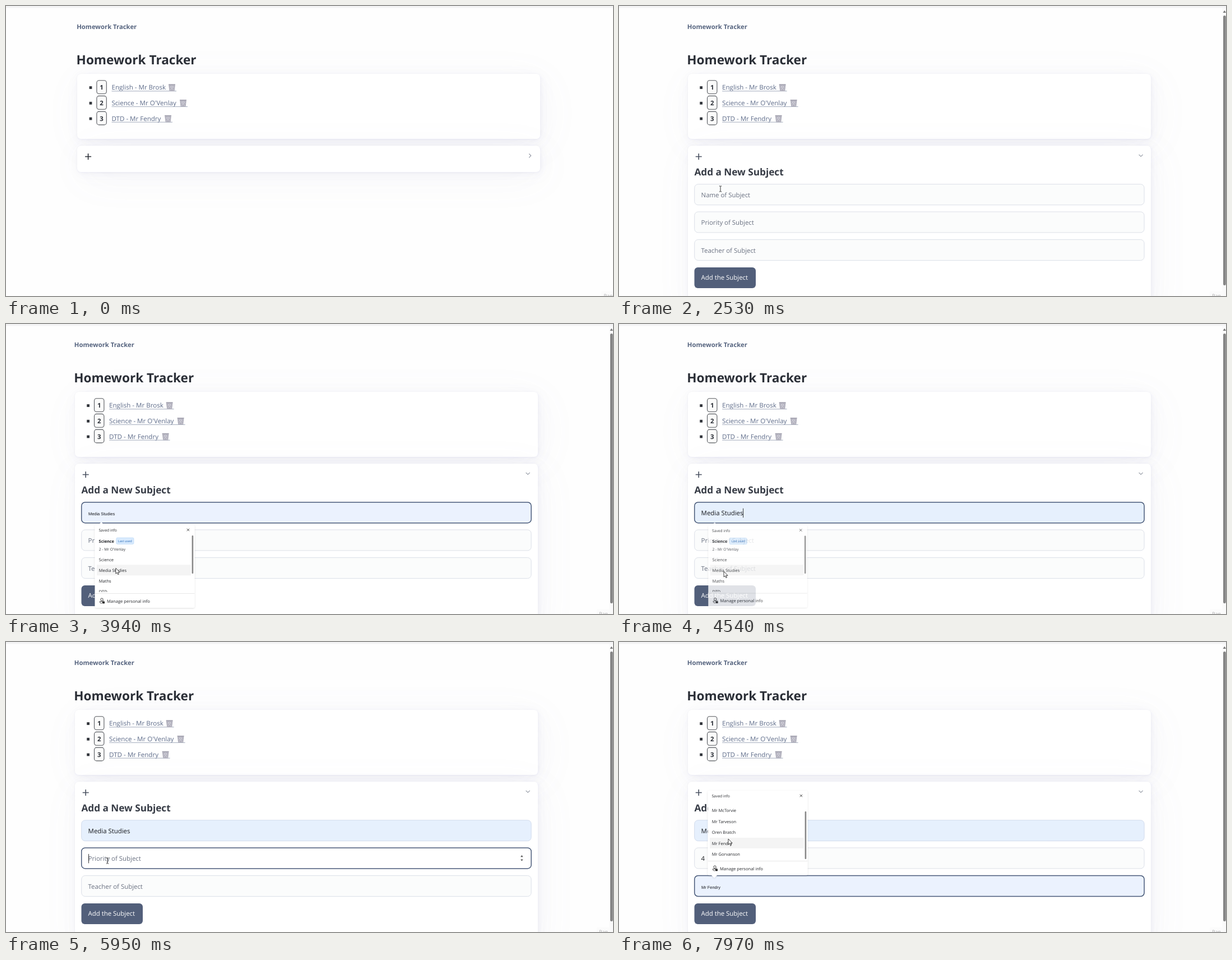
An HTML page for the animation above (8 s loop, 1083 by 517 pixels).

```html
<!DOCTYPE html>
<html lang="en">
<head>
<meta charset="utf-8">
<title>Homework Tracker</title>
<style>
html, body { margin: 0; width: 100%; height: 100%; overflow: hidden; background: #fefefe; }
#stage { position: relative; width: 1083px; height: 517px; overflow: hidden; }
.card {
  position: absolute; left: 127px; width: 826px; border-radius: 7px; background: #fff;
  box-shadow: 0 1px 2px rgba(129,135,185,.03), 1px 1px 5px rgba(129,135,185,.03),
    1px 2px 9px rgba(129,135,185,.035), 1px 3px 17px rgba(129,135,185,.04),
    3px 5px 31px rgba(129,135,185,.045), 6px 12px 74px rgba(129,135,185,.05),
    0 0 0 1px rgba(129,135,185,.015);
}
#list { top: 120.5px; height: 116px; }
#adder { top: 248.5px; }
svg { position: absolute; left: 0; top: 0; }
text { font-family: "Open Sans", "Noto Sans", sans-serif; text-rendering: geometricPrecision; white-space: pre; }
.preview { font-family: "Liberation Sans", Arial, sans-serif; }
</style>
</head>
<body>
<div id="stage">
  <div class="card" id="list"></div>
  <div class="card" id="adder"></div>
  <svg width="1083" height="517" viewBox="0 0 1083 517">
    <defs>
      <clipPath id="clipDown"><rect x="158" y="376" width="180" height="102"/></clipPath>
      <clipPath id="clipUp"><rect x="158" y="288" width="180" height="102"/></clipPath>
      <filter id="soft" x="-10%" y="-10%" width="120%" height="120%">
        <feDropShadow dx="0" dy="1" stdDeviation="1.5" flood-color="#000" flood-opacity=".13"/>
      </filter>
    </defs>
    <rect width="1083" height="3.6" fill="#f4f4f5"/>
    <g id="page"></g>
    <g id="live"></g>
  </svg>
</div>
<script>
const LOOP = 8000;
const OPEN = 2060, FOCUS1 = 2660, FILL = 2950, UNFILL = 3270, SWAP = 3900, PICK = 4500;
const FOCUS2 = 4920, TYPED = 6130, FOCUS3 = 6850, SCROLL = 7480;
const SHIFT = -4.4;
const INK = '#2b2f37', SLATE = '#56647f';
const $ = id => document.getElementById(id);
const clamp = v => Math.max(0, Math.min(1, v));
const between = (t, a, b) => t >= a && t < b;

const text = (x, y, size, fill, str, extra = '') =>
  `<text x="${x}" y="${y}" font-size="${size}" fill="${fill}" ${extra}>${str}</text>`;
const rect = (x, y, w, h, fill, extra = '') =>
  `<rect x="${x}" y="${y}" width="${w}" height="${h}" fill="${fill}" ${extra}/>`;
const line = (d, color, width, extra = '') =>
  `<path d="${d}" fill="none" stroke="${color}" stroke-width="${width}" ${extra}/>`;
const BOLD = 'font-weight="700"';

// Page header and subject list
const subjects = [["English - Mr Brosk", 304], ["Science - Mr O'Venlay", 324], ["DTD - Mr Fendry", 297]];

function bin(x, y) {
  return `<g transform="translate(${x} ${y})"><path d="M0 0H12L10.6 12.5H1.6Z" fill="#b3b2be"/>` +
    line('M3 3L9 11M6 2.6L9.6 7M9 3L3 11M6 2.6L2.6 7', '#dddce4', .7) +
    line('M.2 .6H11.8', '#9d9ca9', 1) + '</g>';
}

function subject([name, end], i) {
  const y = 145 + i * 27.7;
  return rect(148.6, y - 1.9, 4.8, 4.8, '#33363c') +
    rect(161.9, y - 12.3, 17.4, 23.8, '#fbfbfa', 'rx="4" stroke="#55585e" stroke-width="1.1"') +
    text(170.6, y + 4.3, 11.4, INK, i + 1, BOLD + ' text-anchor="middle"') +
    text(188.5, y + 4.4, 11.55, '#5d6b89', name) +
    line(`M188.5 ${y + 6.7}H${end}`, '#98a2b5', .9) +
    bin(end - 14, y - 5.6);
}

$('page').innerHTML =
  text(126.2, 41, 11.3, SLATE, 'Homework Tracker', BOLD) +
  text(125.6, 104.3, 22.6, INK, 'Homework Tracker', BOLD) +
  subjects.map(subject).join('');

// Pointer path: time, x, y
const path = [
  [310, 560, 492], [650, 400, 300], [1050, 270, 158], [1180, 215, 125], [1280, 160, 150],
  [1390, 168, 201], [1600, 130, 225], [1860, 146, 256], [2100, 147, 268], [2530, 181, 326],
  [2660, 181, 334], [2800, 186, 362], [3000, 200, 394], [3200, 206, 411], [3600, 206, 424],
  [3900, 196, 435], [4470, 187, 441], [4560, 187, 441], [4850, 170, 386], [5080, 167, 390],
  [5540, 167, 390], [5680, 181, 390], [6540, 181, 390], [6800, 190, 434], [6900, 192, 434],
  [7150, 215, 396], [7340, 215, 396], [7560, 206, 325], [7970, 195, 351], [8000, 195, 351]
];

function pointerAt(t) {
  const i = Math.max(1, path.findIndex(p => p[0] > t));
  const [t0, x0, y0] = path[i - 1], [t1, x1, y1] = path[i];
  const u = clamp((t - t0) / (t1 - t0)), k = u * u * (3 - 2 * u);
  return [x0 + (x1 - x0) * k, y0 + (y1 - y0) * k];
}

function pointer(t, [x, y]) {
  if (t < 310 || between(t, 6020, 6550)) return '';
  const beam = between(t, 2380, 2760) || between(t, 4700, 6950);
  const shape = beam
    ? line('M-2.2 -5H-.6L0 -4.4L.6 -5H2.2M0 -4.4V4.4M-2.2 5H-.6L0 4.4L.6 5H2.2', '#222', .9)
    : '<path d="M0 0V10L2.3 8L3.9 11.5L5.5 10.8L4 7.4H7.1Z" fill="#fff" stroke="#222" stroke-width=".85"/>';
  return `<g transform="translate(${x.toFixed(2)} ${y.toFixed(2)})">${shape}</g>`;
}

// Form
const blink = (t, since) => (t - since) % 1000 < 500;

function field(y, { value, hint, preview, focus, filled, caret }) {
  const fill = preview ? '#ebf2fe' : filled ? '#e6f0fd' : focus ? '#fff' : '#fbfcfc';
  const stroke = focus ? '#495a79' : filled || preview ? '#cfd9ea' : '#d9dde6';
  let out = rect(134.7, y, 802.4, 37, fill, `rx="6.5" stroke="${stroke}" stroke-width="${focus ? 1.5 : .9}"`);
  if (preview) out += text(147, y + 23.6, 7.45, '#16181c', preview, 'class="preview"');
  else out += text(146.6, y + 23.2, 11.4, value ? '#17191d' : '#697080', value || hint);
  if (caret) out += line(`M${caret} ${y + 11}V${y + 27.5}`, '#222', .9);
  return out;
}

function form(t, hovered) {
  const filling = between(t, FILL, UNFILL);
  const picked = t >= PICK;
  const focus2 = between(t, FOCUS2, FOCUS3);
  const typed = t >= TYPED;
  const preview1 = between(t, FILL, PICK) && (t < SWAP ? 'Science' : 'Media Studies');
  const waiting1 = between(t, FOCUS1, FILL) && blink(t, FOCUS1);
  const picked1 = between(t, PICK, FOCUS2) && blink(t, PICK);
  const caret2 = focus2 && blink(t, typed ? TYPED : FOCUS2);
  let out = text(134.4, 302, 17.2, '#373c46', 'Add a New Subject', BOLD) +
    field(317.7, {
      hint: 'Name of Subject', value: picked && 'Media Studies', preview: preview1,
      focus: between(t, FOCUS1, FOCUS2), filled: picked,
      caret: waiting1 ? 147.5 : picked1 ? 221.6 : 0
    }) +
    field(366.9, {
      hint: 'Priority of Subject', value: typed && '4', preview: filling && '2',
      focus: focus2, caret: caret2 ? (typed ? 154 : 147.5) : 0
    }) +
    field(416.5, {
      hint: 'Teacher of Subject', preview: filling ? "Mr O'Venlay" : hovered,
      focus: t >= FOCUS3, caret: t >= FOCUS3 && !hovered && blink(t, FOCUS3) ? 147.5 : 0
    }) +
    rect(134.5, 466, 109.5, 37, '#525f7a', 'rx="6"') +
    text(146.6, 488.4, 11.4, '#fff', 'Add the Subject');
  if (focus2) out += '<path d="M918 383.2L920.3 380L922.6 383.2ZM918 387.4L920.3 390.6L922.6 387.4Z" fill="#555"/>';
  return out;
}

function header(open) {
  const x = 146.6 + (open ? SHIFT : 0);
  return line(`M${x - 5.5} 268.5h11m-5.5 -5.5v11`, open ? '#4a5261' : INK, 1.6) +
    line(open ? 'M927.6 264.8l3.5 3.5l3.5 -3.5' : 'M933.2 263.3l3.4 3.5l-3.4 3.5', '#8d939f', 1.1);
}

function edges(open) {
  const x = open ? 1053.5 : 1062;
  let out = rect(x, 508.5, open ? 23 : 24, 12, '#fbfbfb', 'rx="2"') +
    text(x + 4.6, 520.3, 9, '#a9a9ab', 'Pan');
  if (open) out += rect(1076.5, 4, 6.5, 513, '#fafafa') +
    rect(1078, 17, 4.8, 481, '#858585', 'rx="2.2"') +
    '<path d="M1077.6 12L1080.3 7.8L1083 12Z" fill="#777"/>';
  return out;
}

// Saved-info popup
function popupFrame(top, bottom, notch, thumb, thumbH, clip, rows) {
  const dir = notch > bottom ? bottom : top;
  return '<g filter="url(#soft)">' + rect(158.5, top, 178, bottom - top, '#fff', 'rx="3"') +
    `<path d="M165 ${dir}L170 ${notch}L175 ${dir}Z" fill="#fff"/></g>` +
    text(165.4, top + 12.2, 6.7, '#25272b', 'Saved info') +
    line(`M322.7 ${top + 6.8}l4.4 4.4m0 -4.4l-4.4 4.4`, '#333', .85) +
    `<g clip-path="url(#${clip})">${rows}</g>` +
    rect(331.6, thumb, 2.6, thumbH, '#888', 'rx="1"') +
    line(`M158.5 ${bottom - 25.5}H336.5`, '#e3e3e3', .8) +
    person(171, bottom - 12.5) +
    text(180, bottom - 9.2, 7.58, '#25272b', 'Manage personal info');
}

function person(x, y) {
  return `<circle cx="${x}" cy="${y - 2.4}" r="2.2" fill="none" stroke="#333" stroke-width=".9"/>` +
    line(`M${x + 1} ${y + 1}H${x - 3.5}Q${x - 4} ${y + 4.4} ${x} ${y + 4.4}`, '#333', .9) +
    rect(x + .8, y + 1.2, 4.2, 3.6, '#222', 'rx=".6"') +
    line(`M${x + 1.8} ${y + 1.4}v-1q1.1 -1.2 2.2 0v1`, '#333', .7);
}

const shade = (y, h) => rect(162, y, 168, h, '#f4f4f4');
const option = (y, name) => text(165.8, y, 7.5, '#25272b', name);

function subjectPopup(t) {
  const closing = t > PICK;
  const alpha = closing ? clamp(1 - (t - 4520) / 120) : clamp((t - 2680) / 60);
  if (!alpha) return '';
  let rows = '';
  if (between(t, FILL, 3180)) rows += shade(378, 31);
  else if (t >= 3180) rows += shade(t < SWAP ? 410 : 429.3, 19);
  rows += text(165.6, 390, 7.35, '#1d1f23', 'Science', BOLD) +
    rect(196.8, 381, 31.2, 11.4, '#d8eafd', 'rx="2" stroke="#b5d5f5" stroke-width=".6"') +
    text(199.8, 388.8, 5.6, '#2b6cb8', 'Last used') +
    text(165.8, 403.6, 6.7, '#33363b', "2 - Mr O'Venlay") +
    ['Science', 'Media Studies', 'Maths', 'DTD'].map((s, i) => option(422.5 + i * 19.3, s)).join('');
  const size = closing ? .95 + .05 * alpha : 1;
  return `<g opacity="${alpha}" transform="translate(247 432) scale(${size}) translate(-247 -432)">` +
    popupFrame(358, 506, 353, 377, 68, 'clipDown', rows) + '</g>';
}

const teachers = ['Mr Brosk', 'Mr McTorvie', 'Mr Tarveson', 'Oren Bratch', 'Mr Fendry', 'Mr Gorvanson'];
const ROW = 19.4;
const scrollAt = t => ROW * clamp((t - SCROLL) / 90);
const rowTop = (i, scroll) => 290.7 + i * ROW - scroll;

function hoveredTeacher(t, y) {
  if (t < 7350 || y > 389) return -1;
  const scroll = scrollAt(t);
  return teachers.findIndex((_, i) => between(y, rowTop(i, scroll), rowTop(i + 1, scroll)));
}

function teacherPopup(t, hovered) {
  const alpha = clamp((t - 6900) / 80);
  if (!alpha) return '';
  const scroll = scrollAt(t);
  const rows = (hovered >= 0 ? shade(rowTop(hovered, scroll), 19) : '') +
    teachers.map((s, i) => option((rowTop(i, scroll) + 12.7).toFixed(2), s)).join('');
  return `<g opacity="${alpha}">` +
    popupFrame(265, 416, 420.5, 289 + 13 * scroll / ROW, 85, 'clipUp', rows) + '</g>';
}

function render(t) {
  const open = t >= OPEN;
  const dx = open ? SHIFT : 0;
  $('list').style.left = $('adder').style.left = 127 + dx + 'px';
  $('adder').style.height = open ? '300px' : '47.5px';
  $('page').setAttribute('transform', `translate(${dx} 0)`);
  const at = pointerAt(t);
  const hovered = hoveredTeacher(t, at[1]);
  $('live').innerHTML = header(open) +
    (open ? form(t, teachers[hovered]) + subjectPopup(t) + teacherPopup(t, hovered) : '') +
    edges(open) + pointer(t, at);
}

const start = performance.now();
function tick() {
  render((performance.now() - start) % LOOP);
  requestAnimationFrame(tick);
}
tick();
</script>
</body>
</html>
```
